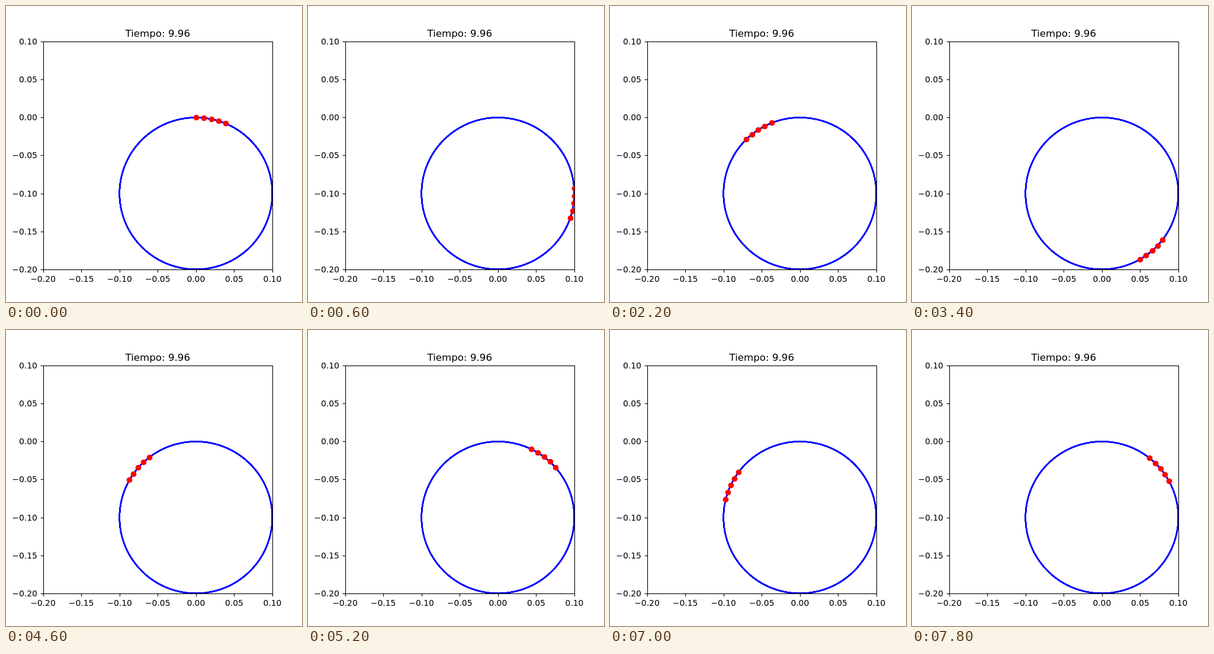
An HTML page with a canvas for the animation above (8000 ms loop, 500 by 500 pixels).

```html
<!DOCTYPE html>
<html lang="es">
<head>
<meta charset="utf-8">
<style>
html, body { margin: 0; width: 100%; height: 100%; overflow: hidden; background: #fff; }
canvas { display: block; width: 500px; height: 500px; }
</style>
</head>
<body>
<canvas id="plot" width="500" height="500"></canvas>
<script>
const ctx = document.getElementById('plot').getContext('2d');
const PT = 100 / 72;                       // pixels per point
const LEFT = 62.5, RIGHT = 450, TOP = 60, BOTTOM = 445;
const STEP_MS = 200, LOOP_MS = 8000;
const RADIUS = 0.1, SAMPLES = 1000, PER_STEP = 5;
const DTHETA = 100 / (SAMPLES - 1);        // angle between samples
const TURN = 63;                           // samples in about one lap

const px = x => LEFT + (x + 0.2) / 0.3 * (RIGHT - LEFT);
const py = y => BOTTOM - (y + 0.2) / 0.3 * (BOTTOM - TOP);
const snap = v => Math.floor(v + 0.5) + 0.5;

function sample(i) {
  const a = i * DTHETA;
  return [px(RADIUS * Math.sin(a)), py(RADIUS * (Math.cos(a) - 1))];
}

function clipToAxes() {
  ctx.beginPath();
  ctx.rect(63, 60, 387, 385);
  ctx.clip();
}

// Laps are stroked one by one, so their soft edges add up
function drawPath() {
  ctx.strokeStyle = '#00f';
  ctx.lineWidth = 1.5 * PT;
  ctx.lineJoin = 'round';
  for (let start = 0; start < SAMPLES - 1; start += TURN) {
    ctx.beginPath();
    const end = Math.min(start + TURN, SAMPLES - 1);
    for (let i = start; i <= end; i++) ctx.lineTo(...sample(i));
    ctx.stroke();
  }
}

function drawDots(step) {
  ctx.fillStyle = '#f00';
  for (let k = 0; k < PER_STEP; k++) {
    const [x, y] = sample(step * PER_STEP + k);
    ctx.beginPath();
    ctx.arc(snap(x), snap(y), 3.5 * PT, 0, 2 * Math.PI);
    ctx.fill();
  }
}

function line(x0, y0, x1, y1) {
  ctx.beginPath();
  ctx.moveTo(x0, y0);
  ctx.lineTo(x1, y1);
  ctx.stroke();
}

function label(text, x, y, size, align) {
  ctx.font = `${size * PT}px "DejaVu Sans", sans-serif`;
  ctx.textAlign = align;
  ctx.fillText(text, x, y);
}

function drawAxes() {
  ctx.strokeStyle = ctx.fillStyle = '#000';
  ctx.lineWidth = 0.8 * PT;
  ctx.strokeRect(63.5, 60.5, 387, 385);
  for (let i = 0; i <= 6; i++) {
    const v = (i - 4) * 0.05;
    const text = (i < 4 ? '\u2212' : '') + Math.abs(v).toFixed(2);
    const x = px(v), y = py(v);
    line(snap(x), 445.5, snap(x), 450.3);
    line(63.5, snap(y), 58.6, snap(y));
    label(text, x, 466, 10, 'center');
    label(text, 52.8, Math.round(y + 5), 10, 'right');
  }
  label('Tiempo: 9.96', 256.25, 52, 12, 'center');
}

function draw(now) {
  const step = Math.floor((now % LOOP_MS) / STEP_MS);
  ctx.fillStyle = '#fff';
  ctx.fillRect(0, 0, 500, 500);
  ctx.save();
  clipToAxes();
  drawPath();
  drawDots(step);
  ctx.restore();
  drawAxes();
}

const t0 = performance.now();
function tick() {
  draw(performance.now() - t0);
  requestAnimationFrame(tick);
}
tick();
</script>
</body>
</html>
```
